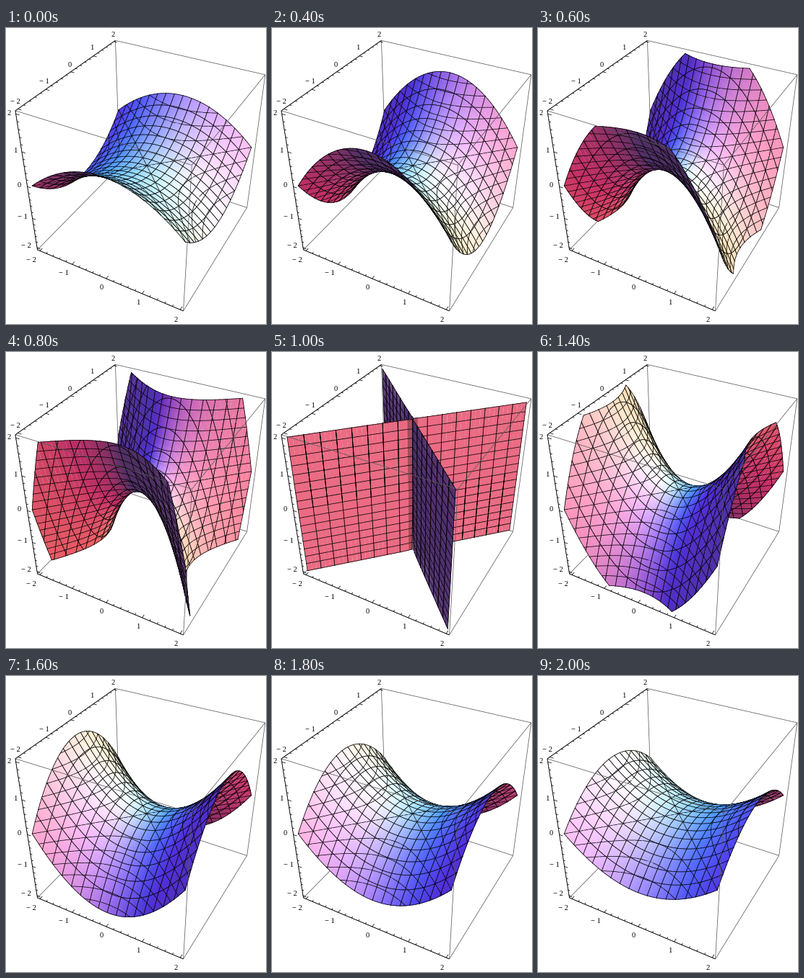
Recreate the animation shown at these times as a matplotlib script. Size 360 px wide and 411 px high, loop 2.1 s.

```python
import itertools

import numpy as np
import matplotlib.pyplot as plt
from matplotlib.animation import FuncAnimation
from matplotlib.collections import LineCollection, PolyCollection

W, H, DPI = 360, 411, 100
PX = 72 / DPI
THIN = 0.75 * PX
FRAMES = 21
R, BOX = 2.0, 2.08          # surface range, padded box half-width
N, STEP = 24, 3             # cells per half axis, cells per mesh line
LEVELS = np.linspace(-R, R, 17)

# Camera, in data units, looking at the centre of the box
EYE = 2 * BOX * np.array([1.3, -2.4, 2.0])
DIST = np.linalg.norm(EYE)
BACK = EYE / DIST
RIGHT = np.cross([0, 0, 1], BACK)
RIGHT /= np.linalg.norm(RIGHT)
CAM = np.array([RIGHT, np.cross(BACK, RIGHT), BACK])

# Red, green and blue lights fixed to the camera
AMBIENT = np.array([0.3125, 0.19, 0.395])
LIGHTS = np.array([[1, 0, 1], [1, 1, 1], [0, 1, 1]], float)
LIGHTS /= np.linalg.norm(LIGHTS, axis=1)[:, None]


def project(p):
    r, u, t = CAM @ np.asarray(p, float).T
    return np.column_stack([195 + 786 * r / (DIST - t),
                            191.2 - 786 * u / (DIST - t)])


def shade(p, c):
    n = np.array([-2 * p[0], 2 * p[1], -c])
    n /= np.linalg.norm(n)
    if n @ (EYE - p) < 0:
        n = -n
    rgb = AMBIENT + 0.81 * np.maximum(LIGHTS @ (CAM @ n), 0)
    if abs(c) < 0.01 and abs(p[0]) < 1 / 12:
        rgb = rgb * 0.72    # dark seam where the planes cross
    return np.minimum(rgb, 1)


def at_height(a, b, z):
    t = (z - a[2]) / (b[2] - a[2])
    return tuple(p + t * (q - p) for p, q in zip(a, b))


def clip(poly, limit, sign):
    out = []
    for a, b in zip(poly, poly[1:] + poly[:1]):
        ina, inb = sign * a[2] <= limit, sign * b[2] <= limit
        if ina:
            out.append(a)
        if ina != inb:
            out.append(at_height(a, b, sign * limit))
    return out


def clip_both(poly):
    poly = clip(poly, R, 1)
    return clip(poly, R, -1) if poly else poly


def cell_lines(corners, i, j):
    """Mesh segments in x, y and z that belong to one cell."""
    a, b, c, d = corners
    for k, (p, q) in ((j, (a, b)), (i + 1, (b, c)), (j + 1, (c, d)), (i, (d, a))):
        if k % STEP == 0 and max(p[2], q[2]) >= -R and min(p[2], q[2]) <= R:
            yield [at_height(p, q, np.clip(e[2], -R, R)) if abs(e[2]) > R else e
                   for e in (p, q)]
    zs = [p[2] for p in corners]
    low, high = min(zs), max(zs)
    for z in LEVELS:
        if low <= z < high:
            hits = [at_height(p, q, z)
                    for p, q in zip(corners, corners[1:] + corners[:1])
                    if (p[2] > z) != (q[2] > z)]
            for m in range(0, len(hits) - 1, 2):
                yield hits[m:m + 2]


def grow(v):
    """Widen a face slightly so no gap opens beside its neighbours."""
    return v + np.clip(v - v.mean(axis=0), -0.35, 0.35)


def surface(c):
    """Pieces of y^2 - x^2 = c z, ordered from back to front."""
    pieces, colors = [], []

    def point(i, j):
        return (i / 12, j / 12, (j * j - i * i) / (144 * c))

    for j in range(N - 1, -N - 1, -1):
        for i in range(-N, N):
            corners = [point(i, j), point(i + 1, j),
                       point(i + 1, j + 1), point(i, j + 1)]
            face = clip_both(corners)
            if len(face) < 3:
                continue
            pieces.append(face)
            colors.append((*shade(np.mean(face, axis=0), c), 1))
            for seg in cell_lines(corners, i, j):
                pieces.append(seg)
                colors.append(None)

    flat = project([p for piece in pieces for p in piece])
    verts = np.split(flat, np.cumsum([len(p) for p in pieces])[:-1])
    is_face = np.array([col is not None for col in colors])
    verts = [grow(v) if f else v for v, f in zip(verts, is_face)]
    fill = [col or (0, 0, 0, 0) for col in colors]
    edge = [(0, 0, 0, 0 if f else 1) for f in is_face]
    return verts, fill, edge, np.where(is_face, 0, THIN)


fig = plt.figure(figsize=(W / DPI, H / DPI), dpi=DPI, facecolor="white")
ax = fig.add_axes([0, 0, 1, 1])
ax.set_xlim(0, W)
ax.set_ylim(H, 0)
ax.axis("off")


def add_lines(segs, color, z):
    ax.add_collection(LineCollection([project(s) for s in segs], colors=[color],
                                     linewidths=THIN, zorder=z))


# Box: edges at the far corner lie behind the surface, the rest in front
far = (-BOX, BOX, -BOX)
edges = [(p, q) for p, q in
         itertools.combinations(itertools.product((-BOX, BOX), repeat=3), 2)
         if sum(a != b for a, b in zip(p, q)) == 1]
add_lines([e for e in edges if far in e], "0.35", 1)
add_lines([e for e in edges if far not in e], "0.35", 3)

# Axes: varying coordinate, fixed point, inward tick direction
AXES = [(0, (0, -BOX, -BOX), (0, 1, 0)),
        (1, (-BOX, 0, BOX), (1, 0, 0)),
        (2, (-BOX, -BOX, 0), (1, 0, 0))]
LABELS = [[(34.5, 321), (80, 339.5), (132, 359.5), (183, 380), (235, 404)],
          [(13, 101), (53, 73.5), (88.5, 50), (119, 27), (148, 8)],
          [(28, 301), (23, 261), (18.5, 217.5), (12.5, 169), (4, 117)]]

for (k, base, inward), spots in zip(AXES, LABELS):
    def on_axis(v):
        p = np.array(base, float)
        p[k] = v
        return p

    segs = [(on_axis(-BOX), on_axis(BOX))]
    for m in range(-10, 11):
        p = on_axis(m / 5)
        size = 0.1 if m % 5 == 0 else 0.055
        segs.append((p, p + size * np.array(inward)))
    add_lines(segs, "black", 4)
    for v, (x, y) in zip(range(-2, 3), spots):
        text = f"\u2212 {-v}" if v < 0 else str(v)
        ax.text(x, y, text, family="Liberation Serif", fontsize=10.5 * PX,
                ha="center", va="center_baseline", zorder=5)

mesh = PolyCollection([], closed=False, capstyle="projecting", zorder=2)
mesh.set_snap(False)
ax.add_collection(mesh, autolim=False)

cache = {}


def update(k):
    if k not in cache:
        cache[k] = surface((10 - k) * 0.4 or 1e-3)
    verts, fill, edge, widths = cache[k]
    mesh.set_verts(verts, closed=False)
    mesh.set_facecolor(fill)
    mesh.set_edgecolor(edge)
    mesh.set_linewidth(widths)
    return [mesh]


anim = FuncAnimation(fig, update, frames=FRAMES, interval=100,
                     repeat=True, repeat_delay=0, blit=False)
plt.show()
```
